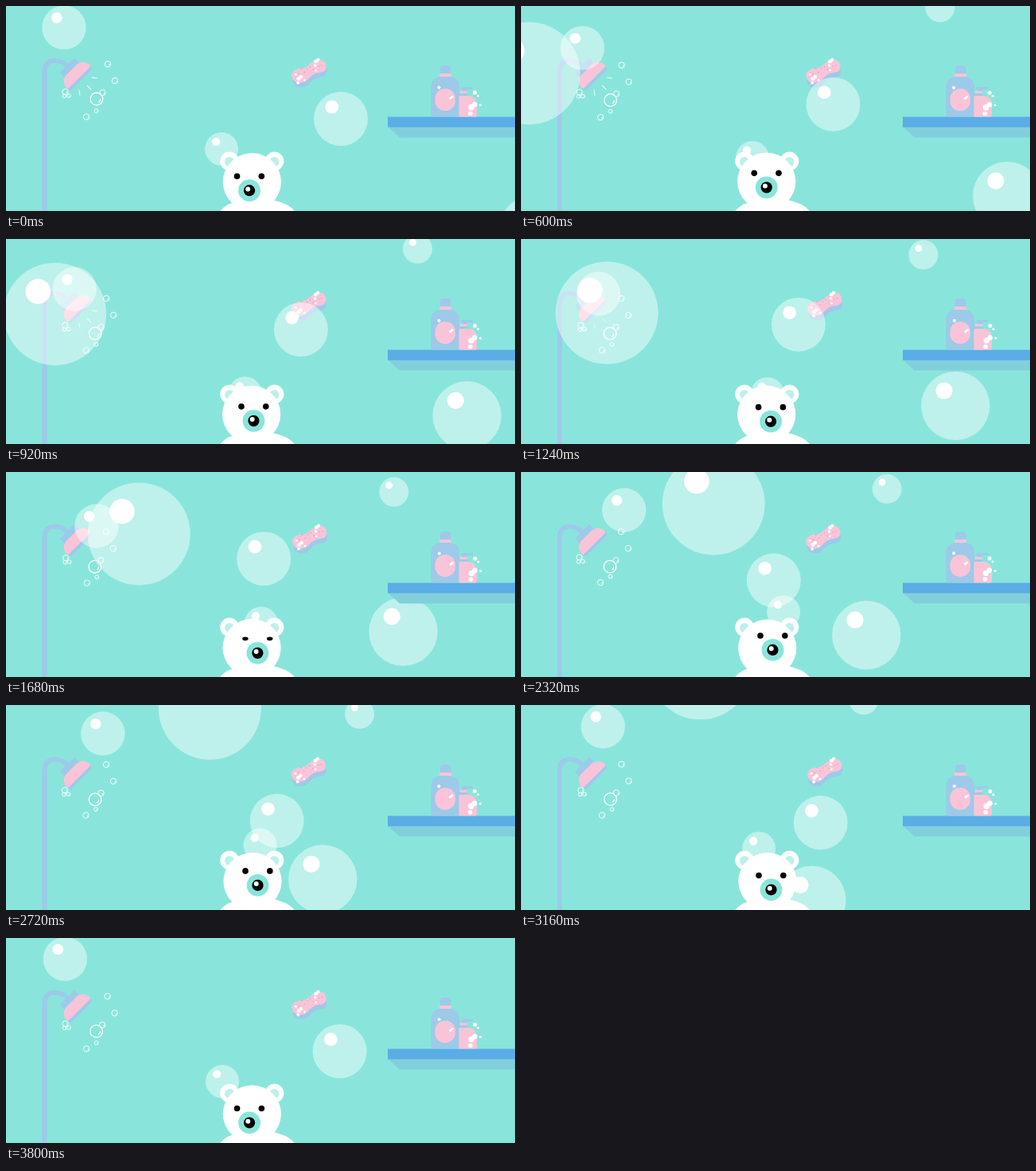
Animation of 640x258 px, one loop 3840 ms. Source, as an HTML page with a canvas:

```html
<!DOCTYPE html>
<html>
<head>
<meta charset="utf-8">
<title>Bath time</title>
<style>
html, body { margin: 0; width: 100%; height: 100%; overflow: hidden; background: #89e5db; }
canvas { display: block; }
</style>
</head>
<body>
<canvas id="stage" width="640" height="258"></canvas>
<script>
const ctx = document.getElementById('stage').getContext('2d');
const LOOP = 3840, TAU = 2 * Math.PI;
const TEAL = '#89e5db', BLUE = '#9dcae9', PINK = '#fac4d8', SHELF = '#5aade6', SHADE = '#82cfdc', WHITE = '#fff';

// Each bubble follows cubic curves that share the loop equally.
const bubbles = [
  { r: 64.5, path: 'M-109 26 C37 122 113 100 199 66 C285 32 303 -38 49 -148' },
  { r: 27.7, path: 'M73 27 C66 57 102 84 122 62 C150 39 94 17 73 27' },
  { r: 18.5, path: 'M536 -25 C531 42 423 50 421 -49' },
  { r: 34, path: 'M421 142 C405 127 331 88 316 117 C296 157 400 150 421 142' },
  { r: 43.2, path: 'M663 282 C567 176 366 160 334 310' },
  { r: 21, path: 'M271 180 C293 194 313 203 326 185 C348 161 287 191 271 180' }
].map(({ r, path }) => ({ r, points: path.match(/-?\d+/g).map(Number) }));

function along(points, progress) {
  const count = (points.length - 2) / 6;
  const i = Math.floor(progress * count), u = progress * count - i, w = 1 - u;
  const cubic = k => {
    const p = n => points[i * 6 + n * 2 + k];
    return w ** 3 * p(0) + 3 * w * w * u * p(1) + 3 * w * u * u * p(2) + u ** 3 * p(3);
  };
  return [cubic(0), cubic(1)];
}

function ease(t, from, to) {
  const u = Math.min(1, Math.max(0, (t - from) / (to - from)));
  return u * u * (3 - 2 * u);
}

function ellipse(x, y, rx, ry, fill) {
  ctx.fillStyle = fill;
  ctx.beginPath();
  ctx.ellipse(x, y, rx, ry, 0, 0, TAU);
  ctx.fill();
}
const disc = (x, y, r, fill = WHITE) => ellipse(x, y, r, r, fill);

function box(x, y, w, h, radii, fill) {
  ctx.fillStyle = fill;
  ctx.beginPath();
  ctx.roundRect(x, y, w, h, radii);
  ctx.fill();
}

function shape(d, fill) {
  ctx.fillStyle = fill;
  ctx.fill(new Path2D(d));
}

function shifted(x, y, draw) {
  ctx.save();
  ctx.translate(x, y);
  draw();
  ctx.restore();
}

function ring(x, y, r, width = 0.9) {
  ctx.strokeStyle = WHITE;
  ctx.lineWidth = width;
  ctx.beginPath();
  ctx.arc(x, y, r, 0, TAU);
  ctx.moveTo(x + r * 0.62, y);
  ctx.arc(x, y, r * 0.62, 0, 1);
  ctx.stroke();
}

// A clump of suds spiralling out from its largest blob.
function foam(x, y, r, count) {
  for (let i = 0; i < count; i++) {
    const reach = r * 1.5 * Math.sqrt(i), angle = 3.2 + i * 2.4;
    disc(x + reach * Math.cos(angle), y + reach * Math.sin(angle), r * (1 - i * 0.12));
  }
}

function drawShower(t, sway) {
  ctx.strokeStyle = BLUE;
  ctx.lineWidth = 6;
  ctx.stroke(new Path2D('M48.5 258V84Q48.5 68.5 61 68.5Q72 68.5 79 78'));
  shifted(88, 86, () => {
    ctx.rotate(-Math.PI / 4);
    box(-13, -16, 26, 12, 1, BLUE);
    box(-20, 2, 40, 8, 3, BLUE);
    box(-20.5, -8, 41, 14, [12, 12, 2, 2], PINK);
    ctx.globalAlpha = 0.9 * (1 - ease(t, 700, 1800));
    ctx.strokeStyle = WHITE;
    ctx.lineWidth = 1;
    for (const angle of [-0.6, 0, 0.6]) {
      ctx.beginPath();
      ctx.moveTo(20 * Math.sin(angle), 20 * Math.cos(angle));
      ctx.lineTo(27 * Math.sin(angle), 27 * Math.cos(angle));
      ctx.stroke();
    }
  });

  const drift = 2.2 * Math.sqrt(Math.sin(Math.PI * t / LOOP));
  shifted(-drift, drift, () => {
    ring(128, 73, 3.7);
    ring(137, 94, 3.7);
    ring(121.5, 109, 3.7);
    ring(114, 117, 7.8, 1.3);
  });
  shifted(...sway, () => {
    ring(113.5, 132, 2.4);
    ring(101, 139.5, 3.7);
    ring(74.5, 108, 3.7);
    ring(73.5, 113.3, 2.3);
    ring(79, 113, 2.3);
  });
}

function drawSponge([dx]) {
  const body = 'M360 89C359 83 365 79 372 79C380 79 382 72 390 69C398 66 403 71 403 77C403 84 397 84 391 85C384 87 382 92 376 96C368 99 361 96 360 89Z';
  shifted(dx - 0.5, -0.6, () => {
    shifted(1, 6, () => shape(body, BLUE));
    shape(body, PINK);
    for (let i = 0; i < 10; i++) disc(365 + i * 3.6, 85 - i * 1.2 + 3 * Math.sin(i * 2.4), 0.7, '#e58fb3');
    foam(390, 70.5, 2.4, 3);
    disc(390, 81.5, 1.4);
    foam(368.5, 92, 2.5, 5);
  });
}

function drawShelf([dx, dy]) {
  shape('M480 152H640V165.5H495Z', SHADE);
  box(480, 139.5, 160, 13, 0, SHELF);
  box(546, 75, 13.5, 11, [4, 4, 1, 1], BLUE);
  box(545, 85, 15, 5, 1, PINK);
  box(534.5, 89, 35.5, 50.5, [12, 12, 2, 2], BLUE);
  box(539.5, 104, 25.5, 28, 12.5, PINK);
  shape('M571 105Q572 101.5 577 102H587V105H580V108H574V105Z', BLUE);
  box(571, 107, 9, 3, 0, PINK);
  box(569.5, 110, 11, 4, 1, BLUE);
  box(569.5, 113, 22.5, 26.5, [1, 10, 2, 1], PINK);
  shifted(dx * 0.4, dy * 0.4, () => {
    disc(544.5, 102.5, 2);
    foam(559, 116, 1.8, 2);
    disc(589.5, 109, 2.5);
    disc(593.5, 113, 1.6);
    disc(596.5, 124.5, 1.6);
    foam(585, 127.5, 3.7, 3);
  });
}

function drawBubble({ r, points }, t) {
  const [x, y] = along(points, t / LOOP);
  disc(x, y, r, 'rgba(255,255,255,.45)');
  disc(x - r * 0.33, y - r * 0.44, r * 0.245);
}

function drawBear(t, angle) {
  const nod = Math.sin(angle);
  const fx = 306 + 10.5 * (ease(t, 0, 1800) - ease(t, 2900, LOOP));
  const fy = 229 + 3.2 * Math.cos(angle) - 2.6 * Math.sin(2 * angle);
  for (const x of [281, 337.5]) {
    disc(x, 195.3, 11.8);
    disc(x, 196, 6, '#bdf0eb');
  }
  ellipse(316, 267, 50, 25, WHITE);
  ellipse(309.3 - 0.7 * nod, 221.3 - 0.6 * nod, 36.6, 36.2, WHITE);
  const open = Math.min(1, 0.1 + Math.abs(t - 1770) / 160);
  for (const side of [-15.5, 15.3]) ellipse(fx + side, fy - 18, 3.8, 3.8 * open, '#000');
  disc(fx, fy, 13.9, TEAL);
  disc(fx, fy, 7.1, '#000');
  disc(fx - 1.8, fy - 1.8, 3);
}

function render() {
  const t = performance.now() % LOOP, angle = TAU * t / LOOP;
  const sway = [-1.1 * Math.sin(2 * angle), 0.7 * Math.sin(angle)];
  ctx.fillStyle = TEAL;
  ctx.fillRect(0, 0, 640, 258);
  drawShower(t, sway);
  drawSponge(sway);
  bubbles.forEach(bubble => drawBubble(bubble, t));
  drawShelf(sway);
  drawBear(t, angle);
  requestAnimationFrame(render);
}
render();
</script>
</body>
</html>
```
